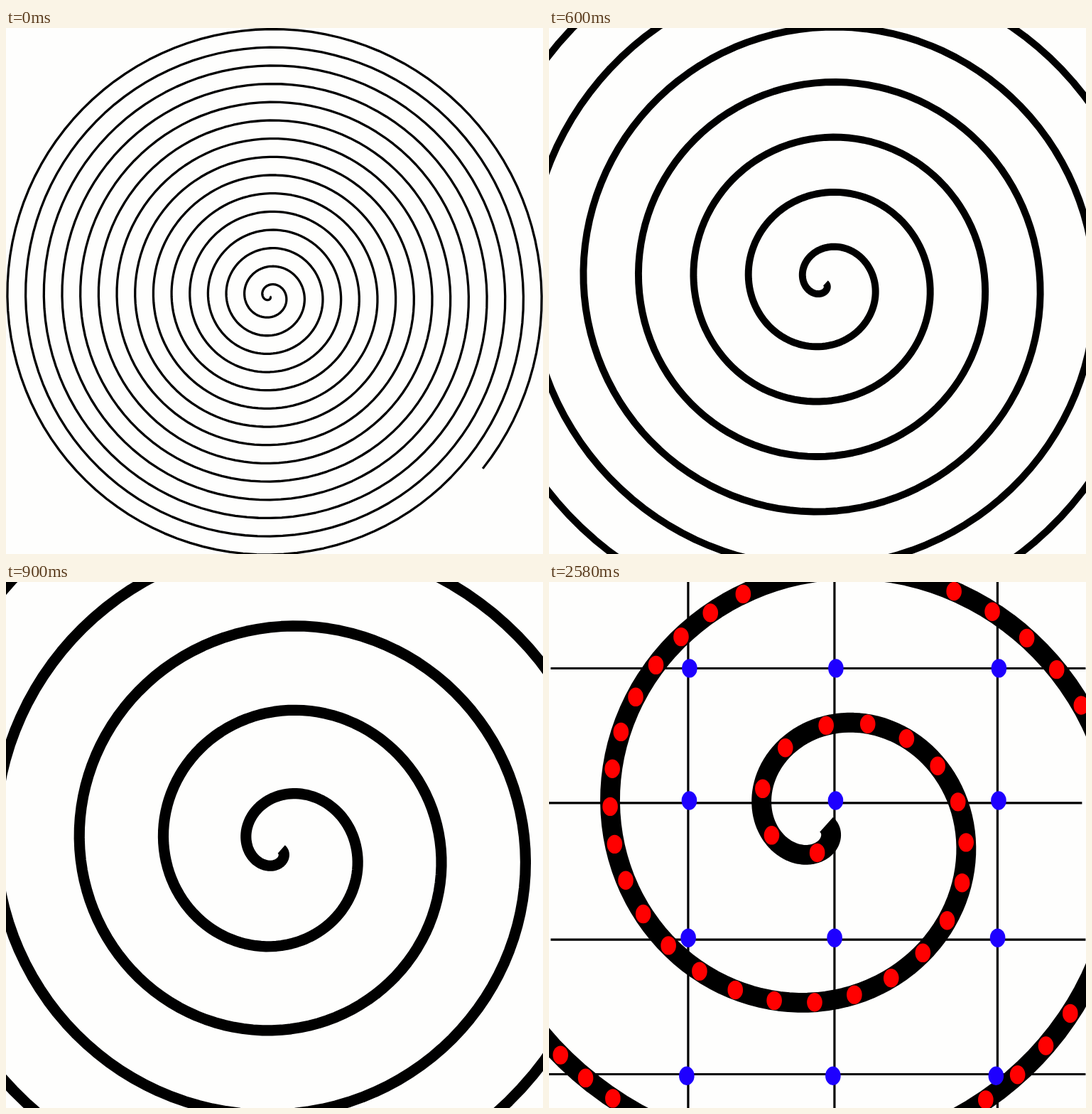
Animation of 756 by 740 pixels, one loop 3300 ms. Source, as an HTML page with a canvas:

```html
<!DOCTYPE html>
<html lang="en">
<head>
<meta charset="utf-8">
<title>Spiral zoom</title>
<style>
  html, body { margin: 0; width: 100%; height: 100%; overflow: hidden; background: #fefefd; }
  canvas { display: block; }
</style>
</head>
<body>
<canvas id="stage" width="756" height="740"></canvas>
<script>
const ctx = document.getElementById('stage').getContext('2d');
const W = 756, H = 740;
const STEP = 300, LOOP = 3300;
const TURNS = 15, START = 0.68;

// Each view: spiral centre and growth in pixels per radian.
const close = { x: 391.1, y: 341.3, b: 34.6, grid: true };
const views = [
  { x: 371.6, y: 377.6, b: 4.088 },
  { x: 371.85, y: 386.15, b: 7.057 },
  { x: 389.4, y: 358.9, b: 12.35 },
  { x: 387.7, y: 376, b: 18.89 },
  close,
  { ...close, marks: true, shift: -0.6 }
];

const columns = [196.5, 402.5, 632];
const rows = [
  { y: 121.5, from: 3, to: W },
  { y: 310.8, from: 0, to: 751 },
  { y: 503.2, from: 3, to: W },
  { y: 692.5, from: 0, to: W }
];

// Dot index and spiral angle; the dots between are evenly spaced along the curve.
const markKeys = [
  [0, 1.205], [4, 4.03], [9, 5.73], [20, 8.291], [30, 9.969],
  [39, 11.449], [50, 12.932], [60, 14.12], [62, 14.314]
];

function spiralPoint({ x, y, b }, t) {
  return [x + b * t * Math.cos(t + START), y + b * t * Math.sin(t + START)];
}

function drawSpiral(view) {
  ctx.beginPath();
  for (let i = 0; i <= TURNS * 120; i++) {
    ctx.lineTo(...spiralPoint(view, i * Math.PI / 60));
  }
  ctx.lineWidth = view.b * 0.805;
  ctx.stroke();
}

function drawGrid() {
  ctx.beginPath();
  for (const x of columns) {
    ctx.moveTo(x, 0);
    ctx.lineTo(x, H);
  }
  for (const { y, from, to } of rows) {
    ctx.moveTo(from, y);
    ctx.lineTo(to, y);
  }
  ctx.lineWidth = 3.2;
  ctx.stroke();
}

function drawDot(x, y, color) {
  ctx.fillStyle = color;
  ctx.beginPath();
  ctx.ellipse(x, y, 10.8, 13.2, 0, 0, Math.PI * 2);
  ctx.fill();
}

// The dots sit loosely on the crossings, drifting a little from row to row.
function drawNodes() {
  rows.forEach(({ y }, i) => {
    const dx = 2 - 0.45 * i * i;
    const dy = 2 * (i - 1.3) ** 2 - 3.5;
    for (const x of columns) drawDot(x + dx, y + dy, '#1e00ff');
  });
}

// Arc length grows with the square of the angle, so blend the squares.
function markAngle(n) {
  const k = markKeys.findIndex(([index]) => index >= n);
  if (k === 0) return markKeys[0][1];
  const [n0, t0] = markKeys[k - 1];
  const [n1, t1] = markKeys[k];
  const f = (n - n0) / (n1 - n0);
  return Math.sqrt(t0 * t0 * (1 - f) + t1 * t1 * f);
}

function drawMarks(view) {
  const last = markKeys[markKeys.length - 1][0];
  for (let n = 0; n <= last; n++) {
    const [x, y] = spiralPoint(view, markAngle(n));
    if (x > 0 && x < W && y > 0 && y < H) drawDot(x, y, '#ff0000');
  }
}

function draw(time) {
  const view = views[Math.min(views.length - 1, Math.floor((time % LOOP) / STEP))];
  ctx.setTransform(1, 0, 0, 1, 0, 0);
  ctx.fillStyle = '#fefefd';
  ctx.fillRect(0, 0, W, H);
  ctx.translate(view.shift || 0, 0);
  ctx.strokeStyle = '#000';
  ctx.lineJoin = 'round';
  drawSpiral(view);
  if (view.grid) {
    drawGrid();
    drawNodes();
  }
  if (view.marks) drawMarks(view);
}

const begin = performance.now();
function tick() {
  draw(performance.now() - begin);
  requestAnimationFrame(tick);
}
tick();
</script>
</body>
</html>
```
